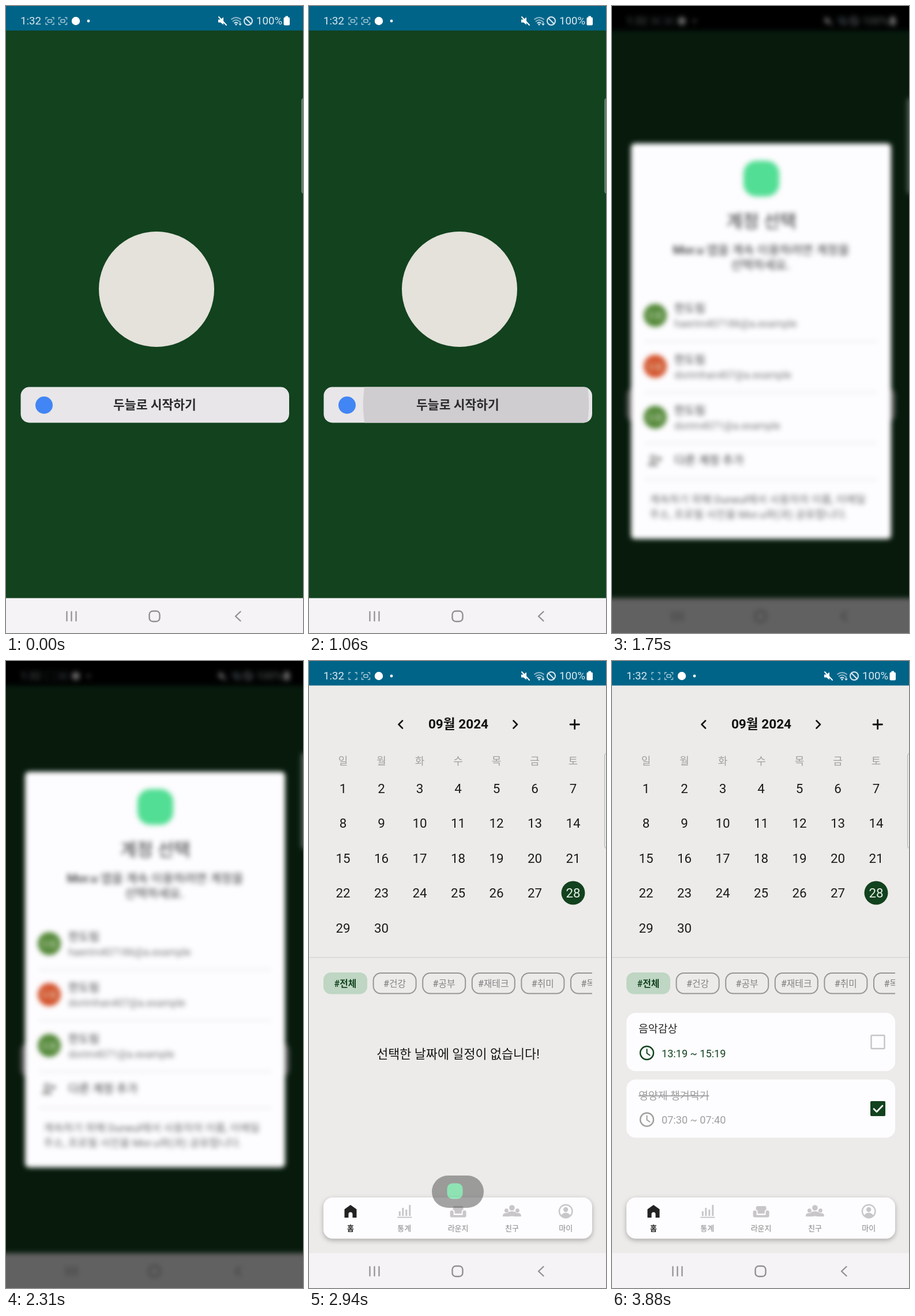
An HTML page for the animation above (3.94 s loop, 515 px wide and 1087 px high).

```html
<!DOCTYPE html>
<html lang="ko">
<head>
<meta charset="utf-8">
<title>일정 앱</title>
<style>
  html, body { margin: 0; width: 100%; height: 100%; overflow: hidden; background: #12421e; }
  svg { display: block; width: 515px; height: 1087px; overflow: hidden; }
  text { font-family: Roboto, "Noto Sans CJK KR", "Noto Sans CJK", sans-serif; white-space: pre; }
  .line { fill: none; stroke-linecap: round; stroke-linejoin: round; }
</style>
</head>
<body>
<svg id="stage" viewBox="0 0 515 1087"></svg>
<script>
const LOOP = 3940;
const GREEN = '#12421e', PAPER = '#ecebe9', WHITE = '#fdfcfe', MUTED = '#a09fa0', ICON = '#c8c6c9';

// Markup helpers
const rect = (x, y, w, h, fill, rx = 0, more = '') =>
  `<rect x="${x}" y="${y}" width="${w}" height="${h}" rx="${rx}" fill="${fill}" ${more}/>`;
const circle = (x, y, r, fill, more = '') => `<circle cx="${x}" cy="${y}" r="${r}" fill="${fill}" ${more}/>`;
const line = (d, stroke, width = 2, more = '') =>
  `<path class="line" d="${d}" stroke="${stroke}" stroke-width="${width}" ${more}/>`;
const shape = (d, fill) => `<path d="${d}" fill="${fill}"/>`;
const text = (x, y, str, size, fill, weight = 400, anchor = 'start', more = '') =>
  `<text x="${x}" y="${y}" font-size="${size}" fill="${fill}" font-weight="${weight}" text-anchor="${anchor}" ${more}>${str}</text>`;
const mid = (x, y, str, size, fill, weight) => text(x, y, str, size, fill, weight, 'middle');
const group = (id, body, more = '') => `<g id="${id}" ${more}>${body}</g>`;
const at = (x, y, body) => `<g transform="translate(${x} ${y})">${body}</g>`;

function statusBar() {
  const ink = '#d9e9f0', faint = '#a9cbd9';
  const corners = line('M-7 -3v-3h3M4 -6h3v3M7 3v3h-3M-4 6h-3v-3', faint, 1.3);
  const lens = rect(-3.5, -2.5, 7, 5, 'none', 1.5, `stroke="${faint}" stroke-width="1.6"`);
  return rect(-20, -20, 555, 62.5, '#006488') +
    group('blackBar', rect(-20, -20, 555, 62.5, '#000')) +
    text(25, 32, '1:32', 18.7, ink) +
    at(76, 26, corners + group('lens', lens)) + at(98.5, 26, corners + lens) +
    circle(121, 26, 7.2, '#fff') + circle(143, 26, 2.4, '#fff') +
    at(375, 26, shape('M-7 -2.5h4l5 -4v13l-5 -4h-4z', '#fff') + line('M-6 -7L7 7', '#fff', 2)) +
    at(399, 26,
      line('M-8 -3Q0 -9 8 -3M-5.5 0.5Q0 -4 5.5 0.5', '#8fb9cb', 2) +
      line('M-2.8 3.5Q0 1.5 2.8 3.5', ink, 2) + circle(0, 6, 1.6, ink) +
      line('M7 1v6M5.2 5l1.8 2l1.8 -2', ink, 1.2)) +
    circle(420, 26, 7, 'none', `stroke="${ink}" stroke-width="2"`) + line('M415 21l10 10', ink, 2) +
    text(434, 32, '100%', 18.7, ink) +
    rect(481.5, 19.5, 10.5, 14, '#fff', 2) + rect(484.5, 17.5, 4.5, 3, '#fff');
}

function systemNav() {
  const ink = '#918f92';
  return rect(-20, 1026.5, 555, 80, '#f5f3f6') +
    line('M105.5 1050v16M113.5 1050v16M121.5 1050v16', ink, 2.2) +
    rect(248.5, 1049, 18, 18, 'none', 6, `stroke="${ink}" stroke-width="2.4"`) +
    line('M406.5 1050l-8.5 8l8.5 8', ink, 2.4);
}

function splash() {
  return rect(-20, -20, 555, 1130, GREEN) +
    circle(261, 491, 100, '#e4e2da') +
    rect(25.5, 660.5, 465.5, 62, '#e8e6e8', 15) +
    `<clipPath id="pill">${rect(25.5, 660.5, 465.5, 62, '#000', 15)}</clipPath>` +
    `<g clip-path="url(#pill)">${circle(0, 0, 1, '#cfcdd0', 'id="ripple"')}</g>` +
    circle(66, 692, 15, '#4285f4') +
    mid(258, 698.5, '두늘로 시작하기', 21.5, '#2b2a2c', 700);
}

function calendar() {
  const colX = i => 59 + i * 66.5;
  let out = line('M162 103.5l-6.5 6.5l6.5 6.5M354.5 103.5l6.5 6.5l-6.5 6.5', '#151515', 2.6) +
    mid(259, 117, '09월 2024', 22.6, '#111', 700) +
    line('M453 110h15.5M460.7 102.2v15.5', '#111', 2.8);
  [...'일월화수목금토'].forEach((d, i) => out += mid(colX(i), 179.5, d, 18, MUTED));
  out += circle(458, 402, 20.5, GREEN);
  for (let d = 1; d <= 30; d++) {
    const i = d - 1;
    out += mid(colX(i % 7), 229 + Math.floor(i / 7) * 60.4, d, 22.4, d === 28 ? '#e6efe7' : '#1b1b1b');
  }
  return out + rect(-20, 513, 555, 2, '#dddcda');
}

function chips() {
  const names = ['전체', '건강', '공부', '재테크', '취미', '독서'];
  const body = names.map((n, i) => {
    const x = 25 + i * 85.6;
    return i
      ? rect(x + 1, 541, 74, 35.5, 'none', 13, 'stroke="#979698" stroke-width="2"') +
        mid(x + 38, 564.5, '#' + n, 15.8, '#858486', 500)
      : rect(x, 540, 76, 37.5, '#bed6c3', 13) + mid(x + 38, 564.5, '#' + n, 15.8, GREEN, 700);
  }).join('');
  return `<clipPath id="row">${rect(25, 530, 466, 60, '#000')}</clipPath><g clip-path="url(#row)">${body}</g>`;
}

function card(y, title, time, done) {
  const ink = done ? MUTED : GREEN;
  const box = done
    ? rect(448, 37.5, 26, 26, GREEN, 2) + line('M454 51l5 5l10 -10.5', '#fff', 2.6)
    : rect(449.5, 39, 23, 23, 'none', 1, 'stroke="#c6c4c7" stroke-width="2.4"');
  return at(0, y, rect(25, 0, 466, 101, WHITE, 16) +
    text(46, 34, title, 18.3, done ? MUTED : '#262626', 400, 'start', done ? 'text-decoration="line-through"' : '') +
    circle(60.5, 69.5, 11.5, 'none', `stroke="${ink}" stroke-width="2.4"`) +
    line('M60.5 63v7l5 3.5', ink, 2) +
    text(86, 76.5, time, 18.1, ink) + box);
}

function tabBar() {
  const person = (x, y, s) =>
    `<g transform="translate(${x} ${y}) scale(${s})">` +
    circle(0, -5, 4, ICON) + shape('M-7.5 7v-2q0 -5 7.5 -5t7.5 5v2z', ICON) + '</g>';
  const tabs = [
    ['홈', shape('M-10.5 11v-14.5l10.5 -7.5l10.5 7.5v14.5h-7v-6a3.5 3.5 0 0 0 -7 0v6z', '#222')],
    ['통계', rect(-12, 9.5, 25, 2, ICON) + rect(-9.5, 0, 3, 8, ICON) + rect(-4, -6, 3, 14, ICON) +
      rect(2, -3, 3, 11, ICON) + rect(8, -11, 3, 19, ICON)],
    ['라운지', shape('M-9 -3v-3q0 -3 3 -3h12q3 0 3 3v3q-3 1 -3 4v3h-12v-3q0 -3 -3 -4z', ICON) +
      shape('M-14 1.5a3 3 0 0 1 6 0v5h16v-5a3 3 0 0 1 6 0v6q0 3 -3 3h-22q-3 0 -3 -3z', ICON)],
    ['친구', person(-9.5, 3, .85) + person(9.5, 3, .85) + person(0, 0, 1.2)],
    ['마이', circle(0, 0, 11.3, 'none', `stroke="${ICON}" stroke-width="2.4"`) + circle(0, -3, 4.2, ICON) +
      shape('M-8 7q3 -4.5 8 -4.5t8 4.5q-3 4 -8 4t-8 -4z', ICON)]
  ];
  return rect(25, 930, 466, 71.5, WHITE, 16, 'style="filter:drop-shadow(0 3px 4px rgba(0,0,0,.28))"') +
    tabs.map(([name, icon], i) => {
      const x = 72 + i * 93.3;
      return at(x, 954, icon) + mid(x, 988, name, 13, i ? '#858486' : '#222', i ? 500 : 700);
    }).join('');
}

function home() {
  return rect(-20, 42, 555, 1000, PAPER) + calendar() + chips() +
    group('empty', mid(258.5, 688.5, '선택한 날짜에 일정이 없습니다!', 21.8, '#141414')) +
    group('cards', card(610, '음악감상', '13:19 ~ 15:19', false) +
      card(725.5, '영양제 챙겨먹기', '07:30 ~ 07:40', true)) +
    tabBar() +
    group('toast', rect(213, 892, 90, 56, '#545454', 28) + rect(239.5, 905.5, 27, 27, '#3ddc84', 9));
}

function dialog() {
  const users = [
    ['한도림', 'haerim407186@a.example', '#55893a'],
    ['한도림', 'dorimhan407@a.example', '#d4552e'],
    ['한도림', 'dorim4071@a.example', '#55893a']
  ];
  const rule = y => rect(57, y, 403, 2, '#e6e4e8');
  const rows = users.map(([name, mail, color], i) => at(0, i * 88.3,
    circle(75, 490, 20, color) + mid(75, 495, '도림', 14, '#e2ead8') +
    text(108, 485, name, 19.5, '#3b3a3d', 500) +
    text(108, 511, mail, 17.8, '#79777b') + rule(534))).join('');
  return rect(33, 192, 451, 686, WHITE, 7) +
    rect(228, 222, 62, 62, '#52de94', 22) +
    mid(259, 338, '계정 선택', 31, '#2f2e31', 500) +
    mid(258.5, 384, 'Mor.u 앱을 계속 이용하려면 계정을', 21, '#39383b', 500) +
    mid(257, 410, '선택하세요.', 21, '#39383b', 500) +
    rows +
    circle(71, 737, 4, 'none', 'stroke="#555" stroke-width="2"') +
    line('M64 750q1 -5 7 -5t7 5zM82 735v8M78 739h8', '#555', 2) +
    text(108, 749, '다른 계정 추가', 20, '#3b3a3d', 500) + rule(774) +
    text(65, 816, '계속하기 위해 Duneul에서 사용자의 이름, 이메일', 18.6, '#69676b') +
    text(65, 842, '주소, 프로필 사진을 Mor.u와(과) 공유합니다.', 18.6, '#69676b');
}

document.getElementById('stage').innerHTML = group('screen',
  splash() + group('home', home()) + systemNav() + statusBar() +
  group('dim', rect(-20, -20, 555, 1130, '#000')) +
  rect(512.5, 160, 14, 165, 'rgba(225,235,228,.35)', 4, 'stroke="rgba(140,145,142,.6)"') +
  group('dialog', dialog()));

// Each track is a list of [ms, value]; ends are held to fill the loop.
function track(id, prop, keys, easing = 'linear') {
  const all = [[0, keys[0][1]], ...keys, [LOOP, keys[keys.length - 1][1]]];
  document.getElementById(id).animate(
    all.map(([ms, value]) => ({ offset: ms / LOOP, [prop]: value, easing })),
    { duration: LOOP, iterations: Infinity });
}
const hold = (id, prop, keys) => track(id, prop, keys, 'step-end');
const disc = (x, r) => `translate(${x}px, 691px) scale(${r})`;
const shift = y => `translate(0px, ${y}px)`;

track('ripple', 'transform', [[940, disc(305, 60)], [1000, disc(297, 130)], [1060, disc(290, 195)], [1130, disc(258, 245)]]);
track('ripple', 'opacity', [[940, 0], [1000, 1], [1250, 1], [1320, 0]]);

const SOFT = 'blur(0.5px)', HIDDEN = 'blur(4.2px)';
hold('screen', 'filter', [[0, SOFT], [1250, HIDDEN], [2560, SOFT]]);
hold('blackBar', 'opacity', [[0, 0], [1250, 1], [2500, 0]]);
hold('lens', 'opacity', [[0, 1], [1310, 0], [1690, 1], [2190, 0]]);
track('dim', 'opacity', [[1250, 0], [1380, .4], [1450, .6], [2380, .6], [2560, 0]]);

track('dialog', 'opacity', [[1560, 0], [1690, 1], [2380, 1], [2500, 0]]);
track('dialog', 'transform', [[1560, shift(130)], [1690, shift(66)], [1755, shift(45)], [1820, shift(24)], [1880, shift(11)], [1940, shift(4)], [2000, shift(0)]]);

track('home', 'opacity', [[2630, 0], [2750, 1]]);
hold('empty', 'opacity', [[0, 1], [3190, 0]]);
hold('cards', 'opacity', [[0, 0], [3190, 1]]);
track('toast', 'opacity', [[2880, 0], [2940, .52], [3000, .95], [3440, .95], [3570, 0]]);
</script>
</body>
</html>
```
